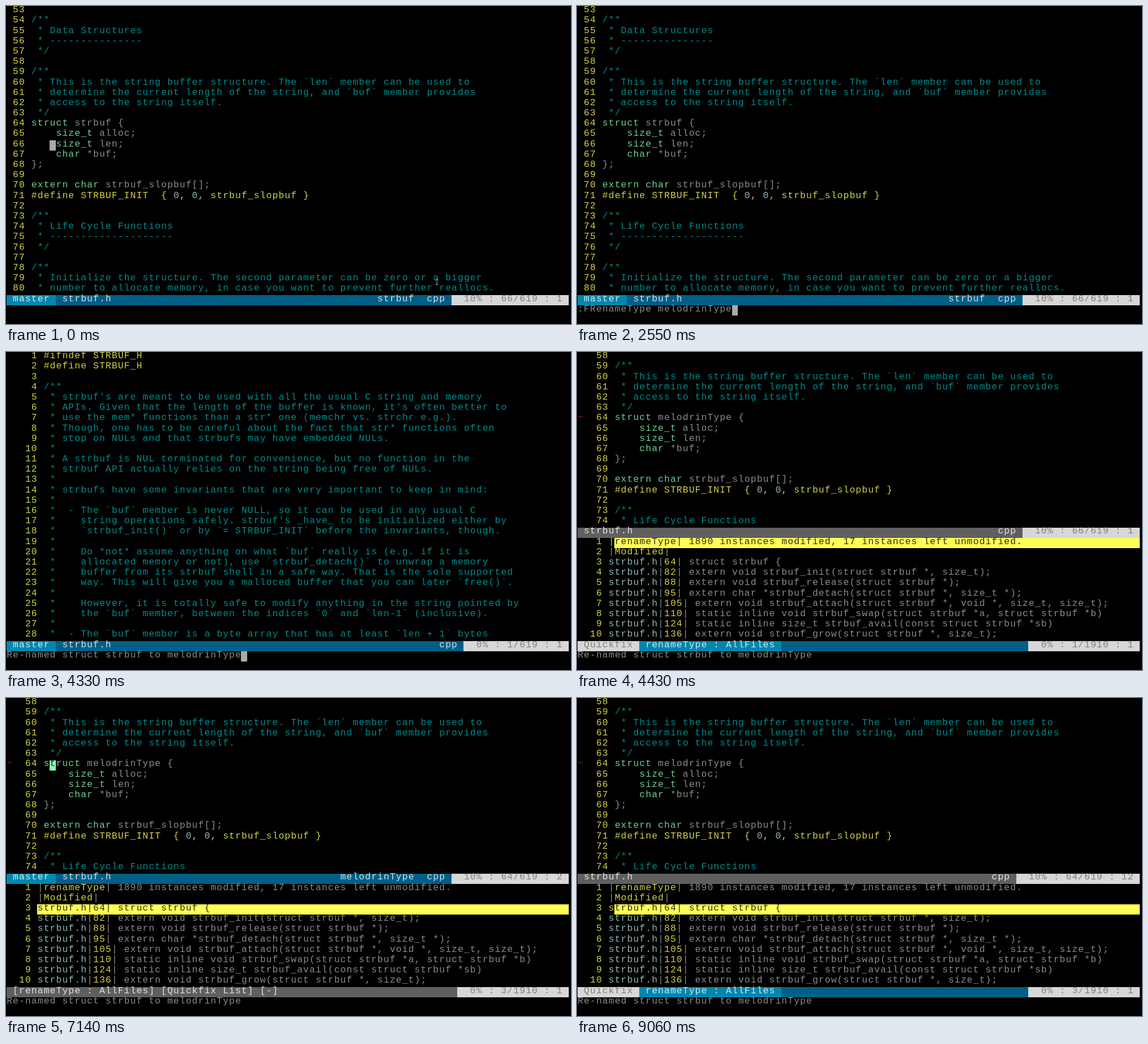
An HTML page with a canvas that plays this animation: 998 by 561 pixels, repeating every 9.86 s.

```html
<!DOCTYPE html>
<html lang="en">
<head>
<meta charset="utf-8">
<title>Renaming a type in the editor</title>
<style>
  html, body { margin: 0; width: 100%; height: 100%; overflow: hidden; background: #000; }
  canvas { display: block; }
</style>
</head>
<body>
<canvas id="stage" width="998" height="561"></canvas>

<script type="text/plain" id="intro">
#ifndef STRBUF_H
#define STRBUF_H

/**
 * strbuf's are meant to be used with all the usual C string and memory
 * APIs. Given that the length of the buffer is known, it's often better to
 * use the mem* functions than a str* one (memchr vs. strchr e.g.).
 * Though, one has to be careful about the fact that str* functions often
 * stop on NULs and that strbufs may have embedded NULs.
 *
 * A strbuf is NUL terminated for convenience, but no function in the
 * strbuf API actually relies on the string being free of NULs.
 *
 * strbufs have some invariants that are very important to keep in mind:
 *
 *  - The `buf` member is never NULL, so it can be used in any usual C
 *    string operations safely. strbuf's _have_ to be initialized either by
 *    `strbuf_init()` or by `= STRBUF_INIT` before the invariants, though.
 *
 *    Do *not* assume anything on what `buf` really is (e.g. if it is
 *    allocated memory or not), use `strbuf_detach()` to unwrap a memory
 *    buffer from its strbuf shell in a safe way. That is the sole supported
 *    way. This will give you a malloced buffer that you can later `free()`.
 *
 *    However, it is totally safe to modify anything in the string pointed by
 *    the `buf` member, between the indices `0` and `len-1` (inclusive).
 *
 *  - The `buf` member is a byte array that has at least `len + 1` bytes
</script>

<script type="text/plain" id="body">

/**
 * Data Structures
 * ---------------
 */

/**
 * This is the string buffer structure. The `len` member can be used to
 * determine the current length of the string, and `buf` member provides
 * access to the string itself.
 */
struct strbuf {
    size_t alloc;
    size_t len;
    char *buf;
};

extern char strbuf_slopbuf[];
#define STRBUF_INIT  { 0, 0, strbuf_slopbuf }

/**
 * Life Cycle Functions
 * --------------------
 */

/**
 * Initialize the structure. The second parameter can be zero or a bigger
 * number to allocate memory, in case you want to prevent further reallocs.
</script>

<script type="text/plain" id="matches">
|renameType| 1890 instances modified, 17 instances left unmodified.
|Modified|
strbuf.h|64| struct strbuf {
strbuf.h|82| extern void strbuf_init(struct strbuf *, size_t);
strbuf.h|88| extern void strbuf_release(struct strbuf *);
strbuf.h|95| extern char *strbuf_detach(struct strbuf *, size_t *);
strbuf.h|105| extern void strbuf_attach(struct strbuf *, void *, size_t, size_t);
strbuf.h|110| static inline void strbuf_swap(struct strbuf *a, struct strbuf *b)
strbuf.h|124| static inline size_t strbuf_avail(const struct strbuf *sb)
strbuf.h|136| extern void strbuf_grow(struct strbuf *, size_t);
</script>

<script>
const LOOP = 9860, COLS = 91, ROWS = 30;
const BLACK = '#000', GREY = '#aaaaaa', YELLOW = '#ffff55', TEAL = '#00aaaa', GREEN = '#87ffaf',
      CYAN = '#afdfdf', RED = '#cc2222', WHITE = '#ffffff', BLUE = '#0087af', NAVY = '#005f87',
      SLATE = '#5f5f5f', LIGHT = '#d7d7d7', DIM = '#6c6c6c';
const NEW_NAME = 'melodrinType';
const COMMAND = ':FRenameType ' + NEW_NAME;
const RESULT = 'Re-named struct strbuf to ' + NEW_NAME;

const ctx = document.getElementById('stage').getContext('2d');
const linesOf = id => document.getElementById(id).textContent.split('\n').slice(1, -1);
const intro = linesOf('intro'), body = linesOf('body'), matches = linesOf('matches');
const cellX = col => 0.6 + col * 10.916;
const cellY = row => 0.5 + row * 18.19;
let grid;

function put(row, col, text, fg = GREY, bg = BLACK) {
  [...text].forEach((ch, i) => { grid[row][col + i] = { ch, fg, bg }; });
}

function recolor(row, col, text, pattern, fg) {
  for (const m of text.matchAll(pattern)) put(row, col + m.index, m[0], fg);
}

function cursor(row, col) {
  const cell = grid[row][col];
  [cell.fg, cell.bg] = [cell.bg, cell.fg];
}

function codeLine(row, col, text) {
  if (/^(\/\*| \*)/.test(text)) return put(row, col, text, TEAL);
  const macro = text.startsWith('#');
  put(row, col, text, macro ? YELLOW : GREY);
  if (macro) recolor(row, col, text, /\b0\b/g, CYAN);
  else recolor(row, col, text, /\b(struct|size_t|char|extern)\b/g, GREEN);
}

function codeWindow(lines, firstNumber, skip, count, left) {
  for (let row = 0; row < count; row++) {
    const number = firstNumber + skip + row;
    put(row, left, String(number).padStart(3), YELLOW);
    codeLine(row, left + 4, lines[skip + row]);
  }
}

function renamedWindow(skip, count) {
  codeWindow(body, 53, skip, count, 2);
  const row = 11 - skip;
  put(row, 0, '~', RED);
  codeLine(row, 6, `struct ${NEW_NAME} {`);
}

function statusBar(row, bg, position, right = '') {
  const start = COLS - 3 - position.length;
  put(row, 0, ' '.repeat(COLS), WHITE, bg);
  put(row, start - 1 - right.length, right, WHITE, bg);
  put(row, start, `  ${position} `, DIM, LIGHT);
}

function fileBar(row, active, position, tag = '') {
  const bg = active ? NAVY : SLATE;
  statusBar(row, bg, position, tag + 'cpp');
  if (active) put(row, 0, ' master ', WHITE, BLUE);
  put(row, active ? 9 : 1, 'strbuf.h', WHITE, bg);
}

function matchWindow(selected) {
  matches.forEach((text, i) => {
    const row = 18 + i;
    put(row, 0, String(i + 1).padStart(4), YELLOW);
    put(row, 5, text);
    recolor(row, 5, text, /^strbuf\.h/g, CYAN);
    recolor(row, 5, text, /(?<=\|)\w+(?=\|)/g, YELLOW);
  });
  for (let col = 5; col < COLS; col++) {
    Object.assign(grid[selected][col], { fg: BLACK, bg: YELLOW });
  }
}

function matchBar(active, line) {
  statusBar(28, active ? NAVY : SLATE, `0% : ${line}/1910 : 1`);
  if (active) {
    put(28, 0, ' Quickfix ', DIM, LIGHT);
    put(28, 10, ' renameType : AllFiles ', WHITE, BLUE);
  } else {
    put(28, 1, '[renameType : AllFiles] [Quickfix List] [-]', WHITE, SLATE);
  }
}

function typingScene(t) {
  codeWindow(body, 53, 0, 28, 0);
  fileBar(28, true, '10% : 66/619 : 1', 'strbuf  ');
  if (t < 1640) return cursor(13, 7);
  const typed = t < 1980 ? ':' : t < 2190 ? ':F' : t < 2550 ? ':FRollback' : COMMAND;
  put(29, 0, typed);
  if (t < 3200) cursor(29, typed.length);
}

function renamingScene() {
  renamedWindow(0, 28);
  fileBar(28, true, '10% : 66/619 : 1', 'strbuf  ');
  put(29, 0, COMMAND);
  cursor(11, 2);
}

function introScene() {
  codeWindow(intro, 1, 0, 28, 2);
  fileBar(28, true, '0% : 1/619 : 1');
  put(29, 0, RESULT);
  cursor(29, RESULT.length);
}

function splitScene(t) {
  const inCode = t >= 6100 && t < 9060;
  const line = t < 5310 ? 1 : t < 5630 ? 2 : 3;
  const step = Math.min(8, Math.floor((t - 7790) / 45));
  const column = t < 7140 ? 1 : t < 7790 ? 2 : 3 + Math.round(step * 9 / 8);
  renamedWindow(5, 17);
  fileBar(17, inCode, t < 6100 ? '10% : 66/619 : 1' : `10% : 64/619 : ${column}`,
          inCode ? NEW_NAME + '  ' : '');
  matchWindow(t < 6100 ? 18 : 20);
  matchBar(!inCode, line);
  put(29, 0, RESULT);
  if (inCode) cursor(6, 5 + column);
  else cursor(17 + line, 5);
}

function eachCell(paint) {
  grid.forEach((cells, row) => cells.forEach((cell, col) => paint(cell, row, col)));
}

function paintGrid() {
  ctx.fillStyle = BLACK;
  ctx.fillRect(0, 0, 998, 561);
  eachCell(({ bg }, row, col) => {
    if (bg === BLACK) return;
    const x = Math.round(cellX(col)), y = Math.round(cellY(row));
    ctx.fillStyle = bg;
    ctx.fillRect(x, y, Math.round(cellX(col + 1)) - x, Math.round(cellY(row + 1)) - y);
  });
  ctx.font = '16.4px "Liberation Mono", monospace';
  ctx.textAlign = 'center';
  ctx.globalAlpha = 0.82;
  eachCell(({ ch, fg }, row, col) => {
    if (ch === ' ') return;
    ctx.fillStyle = fg;
    ctx.fillText(ch, cellX(col + 0.5), cellY(row) + 10.7);
  });
  ctx.globalAlpha = 1;
}

function paintPointer() {
  ctx.fillStyle = GREY;
  ctx.fillRect(759, 482, 4, 1);
  ctx.fillRect(760.5, 483, 1, 8);
  ctx.fillRect(759, 491, 4, 1);
}

function draw() {
  const t = performance.now() % LOOP;
  grid = Array.from({ length: ROWS }, () =>
    Array.from({ length: COLS }, () => ({ ch: ' ', fg: GREY, bg: BLACK })));
  if (t < 3340) typingScene(t);
  else if (t < 4330) renamingScene();
  else if (t < 4430) introScene();
  else splitScene(t);
  paintGrid();
  if (t < 210) paintPointer();
  requestAnimationFrame(draw);
}
draw();
</script>
</body>
</html>
```
